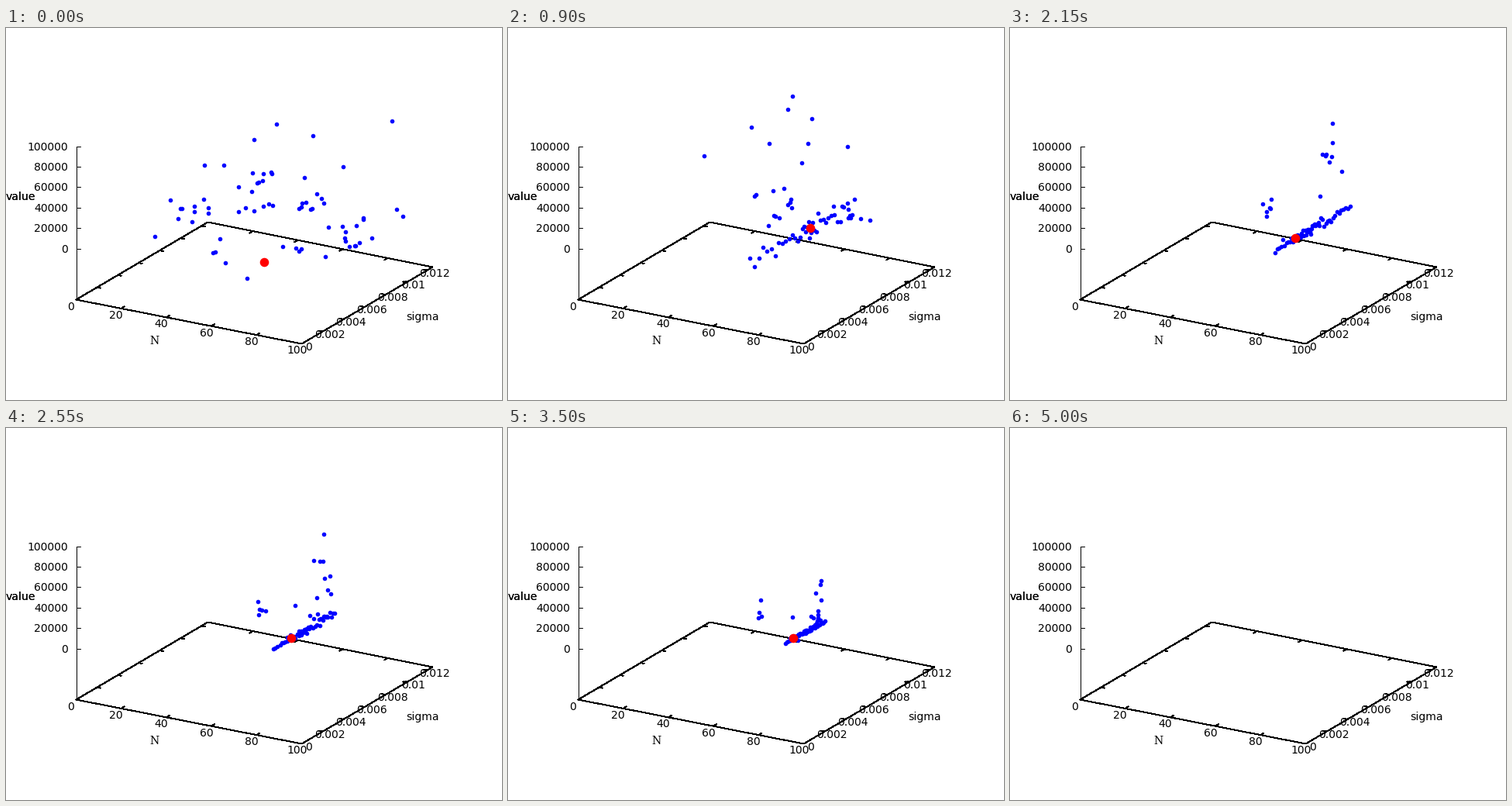
A matplotlib script for the animation above (5050 ms loop, 640 px wide and 480 px high).

```python
import numpy as np
import matplotlib.pyplot as plt
from matplotlib.animation import FuncAnimation

W, H, DPI = 640, 480, 100
FRAMES, STEP = 101, 50
COUNT = 68
PX = 72 / DPI
FONT = 14 * PX

fig = plt.figure(figsize=(W / DPI, H / DPI), dpi=DPI, facecolor="white")
ax = fig.add_axes([0, 0, 1, 1])
ax.set_xlim(-0.5, W - 0.5)
ax.set_ylim(H - 0.5, -0.5)
ax.axis("off")


def line(*pts):
    x, y = zip(*pts)
    ax.plot(x, y, color="black", lw=PX, antialiased=False, zorder=1)


def label(x, y, s, ha="center", family="DejaVu Sans"):
    ax.text(x, y, s, ha=ha, va="baseline", family=family, fontsize=FONT, zorder=2)


def draw_axes():
    line((90, 350), (260, 250), (550, 308), (381, 407), (90, 350))
    line((90, 152), (90, 350))
    for k in range(6):
        y = 284 - 26.4 * k
        line((90, y), (95, y))
        label(79.5, y + 5, str(20000 * k), "right")
        label(83 + 58.4 * k, 363 + 11.4 * k, str(20 * k))
        if 0 < k < 5:
            x, y = 90 + 58.2 * k, 350 + 11.4 * k
            line((x, y), (x + 4, y - 2.4))
            x, y = 260 + 58 * k, 250 + 11.6 * k
            line((x, y), (x - 4, y + 2.4))
    for k in range(7):
        dx, dy = 27 * k, -15.83 * k
        label(390 + dx, 415 + dy, f"{0.002 * k:.3g}")
        if k:
            line((90 + dx, 350 + dy), (94 + dx, 350.8 + dy))
            line((381 + dx, 407 + dy), (377 + dx, 406.2 + dy))
    label(191.5, 407, "N", family="DejaVu Serif")
    label(537, 376, "sigma")
    for _ in range(2):
        label(18.5, 222, "value")


# groups are (count, centre x, centre y, half width, half height)
START = [(348, 123), (497, 119), (395, 138), (319, 143), (255, 176), (280, 176),
         (434, 178), (384, 192), (503, 233), (511, 242), (191, 268), (211, 221),
         (310, 322), (411, 294)]
START_GROUPS = [(15, 322, 210, 26, 26), (9, 242, 238, 30, 18), (9, 398, 220, 22, 14),
                (13, 443, 260, 28, 23), (4, 360, 291, 20, 12), (4, 274, 288, 11, 22)]

# time, ridge from x, ridge to x, ridge scatter, lone points, groups
STAGES = [
    (900, 311, 446, 6,
     [(252, 164), (313, 127), (366, 87), (360, 104), (391, 116), (336, 148),
      (386, 148), (437, 152), (378, 173)],
     [(12, 344, 232, 27, 26), (8, 448, 236, 32, 12)]),
    (1550, 330, 446, 2.6,
     [(390, 112), (397, 132), (407, 149), (427, 174), (291, 175), (321, 186),
      (336, 166), (374, 187)],
     [(8, 342, 220, 42, 11), (6, 443, 216, 11, 20)]),
    (2150, 341, 438, 3,
     [(415, 122), (415, 147), (427, 184), (399, 216)],
     [(5, 408, 165, 7, 12), (6, 329, 232, 8, 17)]),
    (3000, 345, 419, 2.4,
     [(402, 143), (388, 161), (402, 167), (404, 182)],
     [(8, 400, 234, 13, 5), (5, 326, 234, 8, 4)]),
    (4050, 357, 405, 0.8,
     [(328, 222), (397, 241), (375, 274)],
     [(3, 326, 248, 4, 5)]),
    (4400, 357, 403, 0.8, [(328, 174), (326, 240), (322, 250)], []),
    (4950, 357, 398, 0.8, [(328, 201), (325, 241), (318, 250)], []),
]

# the best point holds its place until a better one is found
BEST = [(0, (332, 301)), (450, (389, 257)), (1250, (448, 223)), (1850, (367, 270))]

rng = np.random.default_rng(5)


def scatter(points, groups):
    parts = [np.array(points, float)]
    for n, x, y, w, h in groups:
        parts.append(rng.uniform((x - w, y - h), (x + w, y + h), (n, 2)))
    return np.vstack(parts)


def ridge(n, x0, x1, spread):
    """Points along the sigma direction, densest near the middle."""
    mid = 386
    v = np.linspace(-1, 1, n)
    x = mid + np.where(v < 0, x0 - mid, x1 - mid) * np.abs(v) ** 1.5
    y = 271 - 0.57 * (x - 366) + rng.normal(0, spread, n)
    return np.column_stack([x, y])


def assign(prev, goals):
    """Give each goal to the nearest point that is still free."""
    free = list(range(len(prev)))
    out = np.empty_like(prev)
    for g in goals:
        i = min(free, key=lambda j: np.hypot(*(prev[j] - g)))
        free.remove(i)
        out[i] = g
    return out


def build_poses():
    times, poses = [0], [scatter(START, START_GROUPS)]
    for t, x0, x1, spread, lone, groups in STAGES:
        away = scatter(lone, groups)
        goals = np.vstack([away, ridge(COUNT - len(away), x0, x1, spread)])
        times.append(t)
        poses.append(assign(poses[-1], goals))
    swing = rng.uniform(-1, 1, (len(times), COUNT, 2))
    return np.array(times), poses, swing


TIMES, POSES, SWING = build_poses()


def swarm(t):
    k = min(np.searchsorted(TIMES, t, side="right") - 1, len(TIMES) - 2)
    u = (t - TIMES[k]) / (TIMES[k + 1] - TIMES[k])
    p = POSES[k] + (POSES[k + 1] - POSES[k]) * u
    height = np.clip(262 - p[:, 1], 0, None)
    p[:, 0] += SWING[k, :, 0] * 5 * (1 - t / 5200) * np.sin(2 * np.pi * u)
    p[:, 1] += SWING[k, :, 1] * 0.16 * height * np.sin(np.pi * u)
    return np.round(p)


draw_axes()
dots, = ax.plot([], [], "o", ms=5.6 * PX, mfc="#0000ff", mec="none",
                antialiased=False, zorder=3)
best, = ax.plot([], [], "o", ms=11.6 * PX, mfc="#ff0000", mec="none",
                antialiased=False, zorder=4)


def update(i):
    t = i * STEP
    shown = i < FRAMES - 1
    dots.set_visible(shown)
    best.set_visible(shown)
    if shown:
        dots.set_data(*swarm(t).T)
        x, y = [p for t0, p in BEST if t0 <= t][-1]
        best.set_data([x], [y])
    return dots, best


anim = FuncAnimation(fig, update, frames=FRAMES, interval=STEP,
                     repeat=True, repeat_delay=0, blit=False)
plt.show()
```
